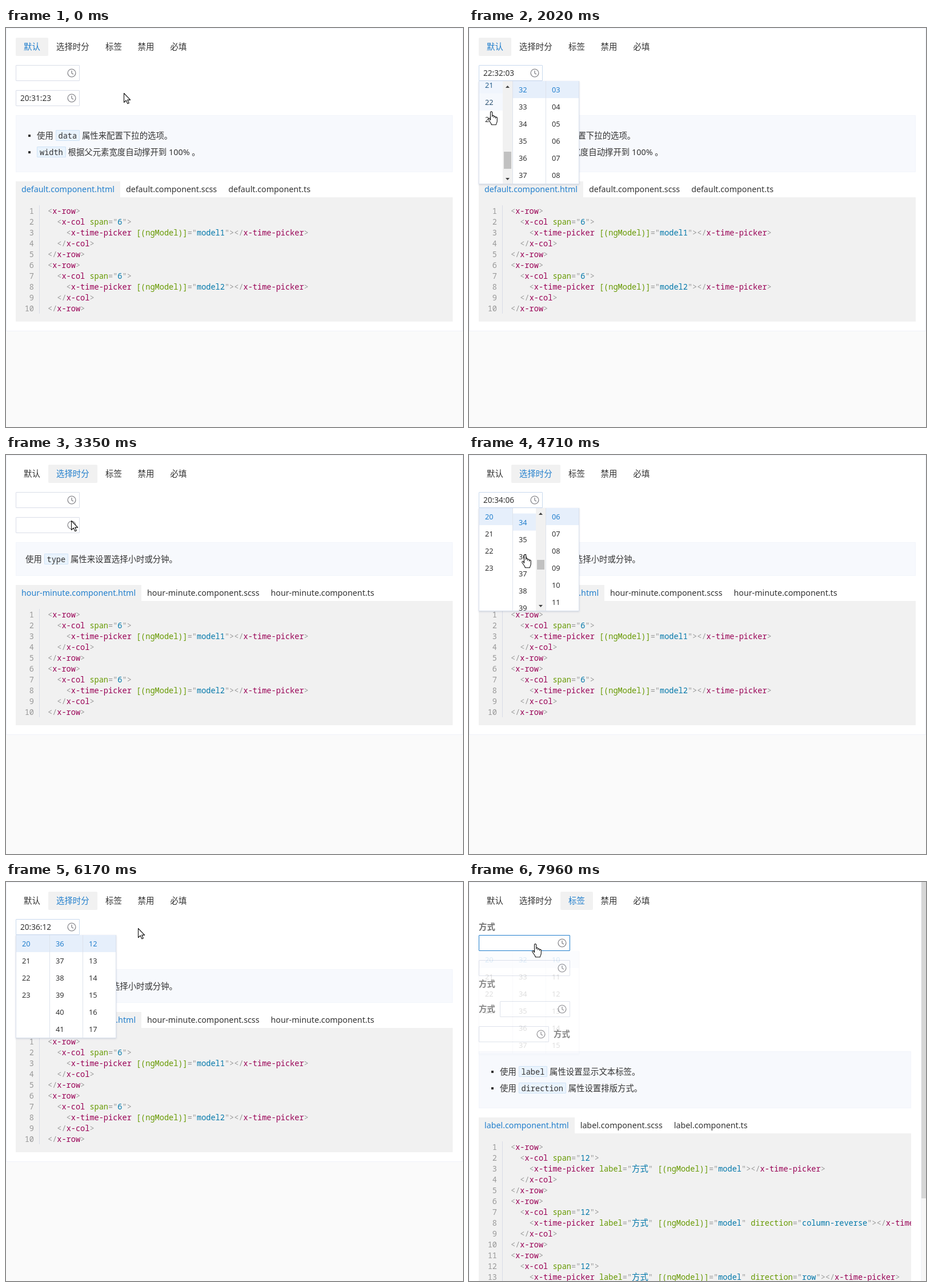
Animation, 800 px wide and 700 px high, one loop 8000 ms. Source, as an HTML page:

```html
<!DOCTYPE html>
<html lang="zh-CN">
<head>
<meta charset="utf-8">
<style>
* { box-sizing: border-box; }
html, body { margin: 0; width: 100%; height: 100%; overflow: hidden; }
body { position: relative; background: #fafafa; color: #333; font: 14.4px 'Noto Sans', 'Noto Sans CJK SC', 'Noto Sans CJK', sans-serif; }
div, svg { position: absolute; white-space: nowrap; }
#panel { left: 0; top: 0; background: #fff; border: 1px solid #f0f2f9; overflow: hidden; }
.page { left: -1px; top: -1px; width: 100%; height: 100%; }
.tab { top: 17px; line-height: 32px; }
#ink { top: 17px; height: 32px; background: #f1f1f1; border-radius: 2px; }
.input { height: 28px; border: 1px solid #d9dde8; border-radius: 1px; background: #fff; padding-left: 7px; font-size: 13.6px; line-height: 26px; }
.input svg { right: 5px; top: 5px; fill: none; stroke: #8b8b90; stroke-width: 1.4; }
.label { line-height: 28px; font-weight: bold; color: #707070; }
.note { left: 17px; right: 16px; background: #f7f9fd; border: 1px solid #f2f5fb; line-height: 29px; }
.note p { margin: 0; position: relative; }
.note.list p::before { content: ''; position: absolute; left: -15px; top: 13px; width: 4px; height: 4px; background: #333; }
code { display: inline-block; padding: 0 4px; line-height: 17px; background: #e9f3fd; border: 1px solid #cfe3f6; border-radius: 1px; }
code, .source { font-family: 'Noto Sans Mono', 'Noto Sans CJK SC', monospace; font-size: 13.6px; }
.files { left: 17px; display: flex; height: 28px; font-size: 14.25px; line-height: 28px; }
.files span { padding: 0 10px; }
.files span:first-child { background: #f1f1f1; color: #227fcd; }
.source { left: 17px; right: 16px; background: #f1f1f1; line-height: 19px; color: #999; overflow: hidden; }
.source div { top: 14px; white-space: pre; }
.source .gutter { width: 42px; padding-right: 9px; text-align: right; border-right: 1px solid #d8dbe6; }
.source .lines { left: 56px; }
i { font-style: normal; }
.tag { color: #905; } .attr { color: #690; } .val { color: #07a; }
.cjk { font-size: 14.4px; line-height: 1; }
#scroll { right: 0; top: 0; width: 8px; height: 700px; background: #f6f6f6; }
#scroll div { width: 8px; height: 555px; background: #d6d6d6; }
#picker { left: 17px; width: 176px; height: 181px; background: #fff; border: 1px solid #d9e0ec; border-top: 0; box-shadow: 0 1px 3px rgba(60, 80, 120, .2); }
.col { top: 0; width: 58px; height: 180px; overflow: hidden; font-size: 12.8px; line-height: 30px; }
.col + .col { border-left: 1px solid #dde3ec; }
.items { width: 100%; }
.items div { width: 100%; height: 30px; padding-left: 10px; }
.bar { right: 0; width: 17px; height: 180px; background: #f1f1f1; }
.bar div { left: 2px; width: 13px; background: #c1c1c1; }
.bar svg { left: 0; top: 0; fill: #444; }
#cursor { left: 0; top: 0; fill: #fff; stroke: #111; stroke-width: 1.1; stroke-linejoin: round; overflow: visible; }
</style>
</head>
<body>
<div id="panel"></div>
<div id="ink"></div>
<div id="tabs"></div>
<div id="scroll"><div></div></div>
<div id="picker"></div>
<svg id="cursor" width="20" height="26"><path></path></svg>
<script>
const $ = id => document.getElementById(id);
const clamp = x => Math.max(0, Math.min(1, x));
const smooth = x => (x = clamp(x), x * x * (3 - 2 * x));
const mix = (a, b, k) => a + (b - a) * k;
const pad = n => String(n).padStart(2, '0');
const BLUE = '#227fcd', LOOP = 8000;

// Page markup
const clock = '<svg width="16" height="16"><circle cx="8" cy="8" r="6.9"/><path d="M8 3.8V8.3l3 1.8"/></svg>';
const input = (x, y, w, text = '') =>
  `<div class="input" style="left:${x}px;top:${y}px;width:${w}px"><span>${text}</span>${clock}</div>`;
const label = (x, y) => `<div class="label" style="left:${x}px;top:${y}px">方式</div>`;

const highlight = line => line.replace(/<(\/?)([\w-]+)|([^\s=<>"]+)="([^"]*)"|>/g, (m, slash, tag, attr, val) =>
  tag ? `&lt;${slash}<i class="tag">${tag}</i>`
  : attr ? `<i class="attr">${attr}</i>="<i class="val">${val.replace('方式', '<i class="cjk">方式</i>')}</i>"`
  : '&gt;');

const row = (span, attrs) => ['<x-row>', `  <x-col span="${span}">`,
  `    <x-time-picker ${attrs}></x-time-picker>`, '  </x-col>', '</x-row>'];

const note = (y, items) => {
  const list = items.length > 1;
  return `<div class="note ${list ? 'list' : ''}" style="top:${y}px;padding:${list ? '20px 36px' : '14px 16px'}">` +
    items.map(s => `<p>${s}</p>`).join('') + '</div>';
};
const source = (y, name, lines) =>
  `<div class="files" style="top:${y}px">${['html', 'scss', 'ts'].map(e => `<span>${name}.component.${e}</span>`).join('')}</div>
  <div class="source" style="top:${y + 28}px;height:${lines.length * 19 + 28}px">
    <div class="gutter">${lines.map((_, i) => i + 1).join('\n')}</div>
    <div class="lines">${lines.map(highlight).join('\n')}</div></div>`;

const basicLines = [...row(6, '[(ngModel)]="model1"'), ...row(6, '[(ngModel)]="model2"')];
const labelled = extra => row(12, `label="方式" [(ngModel)]="model"${extra}`);
const pageMarkup = [
  input(17, 65, 112) + input(17, 109, 112, '20:31:23') +
    note(153, ['使用 <code>data</code> 属性来配置下拉的选项。', '<code>width</code> 根据父元素宽度自动撑开到 100% 。']) +
    source(269, 'default', basicLines),
  input(17, 65, 112) + input(17, 109, 112) +
    note(153, ['使用 <code>type</code> 属性来设置选择小时或分钟。']) +
    source(228, 'hour-minute', basicLines),
  label(17, 65) + input(17, 93, 160) + input(17, 137, 160) + label(17, 165) +
    label(17, 209) + input(54, 209, 123) + input(17, 253, 123) + label(148, 253) +
    note(297, ['使用 <code>label</code> 属性设置显示文本标签。', '使用 <code>direction</code> 属性设置排版方式。']) +
    source(413, 'label', [...labelled(''), ...labelled(' direction="column-reverse"'), ...labelled(' direction="row"')])
];
$('panel').innerHTML = pageMarkup.map(html => `<div class="page">${html}</div>`).join('');
const pages = [...document.querySelectorAll('.page')];
const firstInputs = pages.map(p => p.querySelector('.input'));

const tabX = [17, 74, 160, 216.5, 273.5], tabWidth = [57, 86, 57];
$('tabs').innerHTML = ['默认', '选择时分', '标签', '禁用', '必填']
  .map((s, i) => `<div class="tab" style="left:${tabX[i] + 14}px">${s}</div>`).join('');
const tabs = [...document.querySelectorAll('.tab')];

// Picker columns
const columns = [24, 60, 60].map((count, i) => {
  const el = document.createElement('div');
  el.className = 'col';
  el.style.left = i * 58 + 'px';
  el.innerHTML = '<div class="items">' +
    Array.from({ length: count }, (_, n) => `<div style="top:${n * 30}px">${pad(n)}</div>`).join('') +
    '</div><div class="bar"><svg width="17" height="180"><path d="M5 12l3.5-4 3.5 4zM5 170l3.5 4 3.5-4z"/></svg><div></div></div>';
  $('picker').append(el);
  const [items, bar] = el.children;
  return { count, items, rows: [...items.children], bar, thumb: bar.lastChild };
});

// Timeline
const enterAt = [-1e4, 2870, 6949, 1e6], tabAt = [-1e4, 2850, 6930];
const panelHeight = [532, 491, 900];
const sessions = [
  { open: 830, close: 2560, y: 93, now: [20, 32, 3], picks: [[1590, 0, 21], [1980, 0, 22]] },
  { open: 3700, close: 6390, y: 93, now: [20, 32, 6],
    picks: [[4585, 1, 34], [4790, 1, 36], [5190, 2, 8], [5380, 2, 10], [5580, 2, 12]] },
  { open: 7915, close: 1e6, y: 121, now: [20, 32, 10], picks: [] }
];
const path = [
  [0, 206, 114], [70, 206, 114], [560, 105, 84], [1380, 105, 84], [1560, 38, 146], [2080, 38, 146],
  [2400, 167, 72], [2570, 167, 72], [2820, 118, 38], [3000, 118, 38], [3350, 114, 115], [3400, 114, 115],
  [3650, 105, 84], [4260, 105, 84], [4540, 97, 174], [4900, 97, 174], [5060, 155, 174], [5680, 155, 174],
  [5940, 229, 82], [6060, 229, 82], [6170, 231, 81], [6390, 231, 81], [6800, 193, 43], [7460, 193, 43],
  [7800, 115, 108], [LOOP, 115, 108]
];
const ARROW = 'M.5.5V16.5l3.7-3.5 2.7 5.7 2.4-1-2.6-5.6h5z';
const HAND = 'M-.5 15.5V2.2a1.6 1.6 0 0 1 3.2 0V9.5V8.7a1.5 1.5 0 0 1 3 .3v2v-1a1.5 1.5 0 0 1 2.9.3v2v-1.1' +
  'a1.4 1.4 0 0 1 2.7.5V17c0 3-1.5 4-2 6.8H1.5C1 21-1.5 18.5-4 14.8c-1-1.6 1-2.9 2.2-1.7z';

function cursorAt(t) {
  const i = path.findIndex(p => p[0] > t);
  const [a, b] = [path[i - 1], path[i]];
  const k = smooth((t - a[0]) / (b[0] - a[0]));
  return [mix(a[1], b[1], k), mix(a[2], b[2], k)];
}

function drawPages(t, page) {
  pages.forEach((el, i) => {
    const p = smooth((t - enterAt[i]) / 380);
    const gone = clamp((t - enterAt[i + 1]) / 120);
    el.style.visibility = t >= enterAt[i] && gone < 1 ? 'visible' : 'hidden';
    el.style.opacity = mix(.5, 1, p) * (1 - gone);
    el.style.transform = `translateX(${760 * (1 - p)}px)`;
  });
  $('panel').style.width = (page == 2 ? 792 : 800) + 'px';
  $('panel').style.height = panelHeight[page] + 'px';
  $('scroll').style.display = page == 2 ? '' : 'none';

  const active = tabAt.filter(a => t >= a).length - 1, from = Math.max(0, active - 1);
  const k = smooth((t - tabAt[active]) / 200);
  $('ink').style.left = mix(tabX[from], tabX[active], k) + 'px';
  $('ink').style.width = mix(tabWidth[from], tabWidth[active], k) + 'px';
  tabs.forEach((el, i) => el.style.color = i == active ? BLUE : '#333');
}

function drawPicker(t, x, y) {
  const s = sessions.filter(s => t >= s.open).pop() || sessions[0];
  const opened = t >= s.open && t < s.close;
  $('picker').style.top = s.y + 'px';
  $('picker').style.opacity = clamp((t - s.open) / 300) * (1 - clamp((t - s.close) / 200));
  columns.forEach((col, c) => {
    let prev = s.now[c], value = prev, since = -1e4;
    for (const [at, column, picked] of s.picks)
      if (column == c && t >= at) [prev, value, since] = [value, picked, at];
    const scroll = 30 * mix(prev, value, clamp((t - since) / 150));
    const fade = clamp((t - since) / 100);
    col.items.style.transform = `translateY(${-scroll}px)`;
    col.rows.forEach((el, n) => {
      const w = n == value ? fade : n == prev ? 1 - fade : 0;
      el.style.background = `rgba(230,239,251,${w})`;
      el.style.color = `color-mix(in srgb, ${BLUE} ${w * 100}%, #333)`;
    });
    const left = 18 + c * 58;
    const hovered = opened && x >= left && x < left + 58 && y >= s.y && y < s.y + 180;
    const content = col.count * 30 + 150, size = Math.max(17, 180 / content * 146);
    col.bar.style.display = hovered ? '' : 'none';
    col.thumb.style.height = size + 'px';
    col.thumb.style.top = 17 + scroll / (content - 180) * (146 - size) + 'px';
  });
  return opened && x > 17 && x < 193 && y >= s.y && y < s.y + 180;
}

function drawInputs(t) {
  sessions.forEach((s, i) => {
    const done = s.picks.filter(p => t >= p[0]);
    const time = [...s.now];
    done.forEach(([, column, value]) => time[column] = value);
    firstInputs[i].firstChild.textContent = done.length ? time.map(pad).join(':') : '';
    const focused = t >= s.open - 150 && t < s.close && !done.length;
    firstInputs[i].style.borderColor = focused ? BLUE : done.length && t < s.close ? '#c8d9ee' : '';
  });
}

function draw(t) {
  const page = enterAt.filter(a => t >= a).length - 1;
  const [x, y] = cursorAt(t);
  drawPages(t, page);
  drawInputs(t);
  const overPicker = drawPicker(t, x, y);
  const inputY = page == 2 ? 93 : 65, inputRight = page == 2 ? 177 : 129;
  const overInput = x > 17 && x < inputRight && y > inputY && y < inputY + 28;
  const overTab = x > 17 && x < 330 && y > 17 && y < 49;
  $('cursor').firstElementChild.setAttribute('d', overPicker || overInput || overTab ? HAND : ARROW);
  $('cursor').style.transform = `translate(${Math.round(x)}px,${Math.round(y)}px)`;
}

const start = performance.now();
(function frame() {
  draw((performance.now() - start) % LOOP);
  requestAnimationFrame(frame);
})();
</script>
</body>
</html>
```
